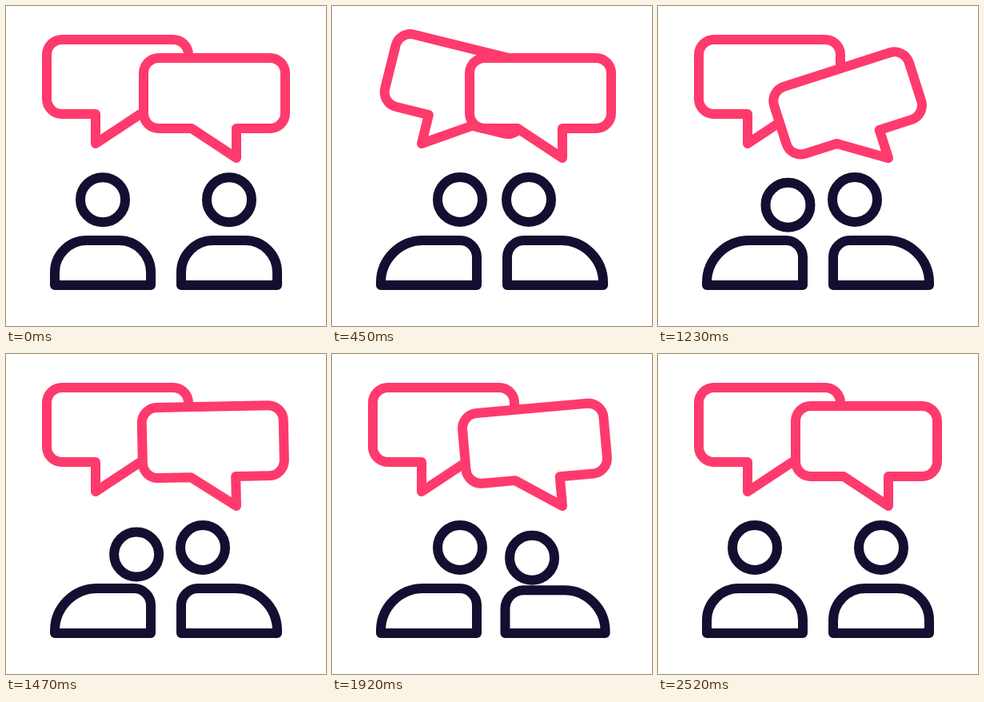
Recreate the animation shown at these times as an HTML page. Size 400 by 400 pixels, loop 2.55 s.

```html
<!DOCTYPE html>
<html lang="en">
<head>
<meta charset="utf-8">
<title>Conversation</title>
<style>
  html, body { margin: 0; width: 100%; height: 100%; overflow: hidden; background: #fff; }
  svg { display: block; width: 100%; height: 100%; }
</style>
</head>
<body>
<svg viewBox="0 0 400 400" fill="#fff" stroke-width="12" stroke-linejoin="round">
  <g stroke="#ff3a6c">
    <path id="bubbleL" d="M70 42H209A19 19 0 0 1 228 61V116A19 19 0 0 1 209 135H168L112 172V135H70A19 19 0 0 1 51 116V61A19 19 0 0 1 70 42Z"/>
    <path id="bubbleR" d="M191 65H330A19 19 0 0 1 349 84V134A19 19 0 0 1 330 153H288V190L232 153H191A19 19 0 0 1 172 134V84A19 19 0 0 1 191 65Z"/>
  </g>
  <g stroke="#120f30" fill="none">
    <path id="bodyL"/><circle id="headL" r="28"/>
    <path id="bodyR"/><circle id="headR" r="28"/>
  </g>
</svg>
<script>
const LOOP = 2550;
const $ = id => document.getElementById(id);
const ease = u => u * u * (3 - 2 * u);
const progress = (t, from, to) => Math.min(1, Math.max(0, (t - from) / (to - from)));

// Eased interpolation through [time, value] keys
function track(keys, t) {
  let [t0, v0] = keys[0];
  for (const [t1, v1] of keys) {
    if (t < t1) return v0 + (v1 - v0) * ease(progress(t, t0, t1));
    [t0, v0] = [t1, v1];
  }
  return v0;
}

const swingL = [[0, 0], [180, -22], [468, 14.3], [690, -9.6], [960, 3.7], [1205, 0]];
const swingR = [[1080, 0], [1290, -22], [1620, 14.3], [1815, -9.6], [2085, 3.7], [2330, 0]];
const nodL = [[690, 0], [890, 0.92], [1100, 0.3], [1380, 1], [1680, 0]];

const people = [
  { side: 'L', x: 121, dir: 1, shift: 39, back: [2030, 2515], nod: nodL },
  { side: 'R', x: 279, dir: -1, shift: 33, back: [1815, 2300], nod: [[0, 0]] }
];

function drawPerson({ side, x, dir, shift, back, nod }, t) {
  const go = progress(t, 0, 420), ret = progress(t, ...back);
  const lean = ease(go) - ease(ret);
  const squash = Math.sin(Math.PI * go) + Math.sin(Math.PI * ret);
  const dip = track(nod, t);

  const head = $('head' + side);
  head.setAttribute('cx', x + dir * (shift * lean + 4 * dip));
  head.setAttribute('cy', 242 + 20 * squash + 11 * dip);

  const halfWidth = 60 + 4 * squash;
  const top = 293 + 3.4 * squash;
  const outer = 40 + 13 * lean, inner = 40 - 19 * lean;
  const px = d => x + dir * d;
  const sweep = dir > 0 ? 1 : 0;
  $('body' + side).setAttribute('d',
    `M${px(-halfWidth)} 349V${top + outer}` +
    `A${outer} ${outer} 0 0 ${sweep} ${px(outer - halfWidth)} ${top}` +
    `H${px(halfWidth - inner)}` +
    `A${inner} ${inner} 0 0 ${sweep} ${px(halfWidth)} ${top + inner}V349Z`);
}

function draw(now) {
  const t = now % LOOP;
  $('bubbleL').setAttribute('transform', `rotate(${track(swingL, t)} 112 172)`);
  $('bubbleR').setAttribute('transform', `rotate(${track(swingR, t)} 288.5 190)`);
  for (const person of people) drawPerson(person, t);
}

const start = performance.now();
function frame() {
  draw(performance.now() - start);
  requestAnimationFrame(frame);
}
frame();
</script>
</body>
</html>
```
